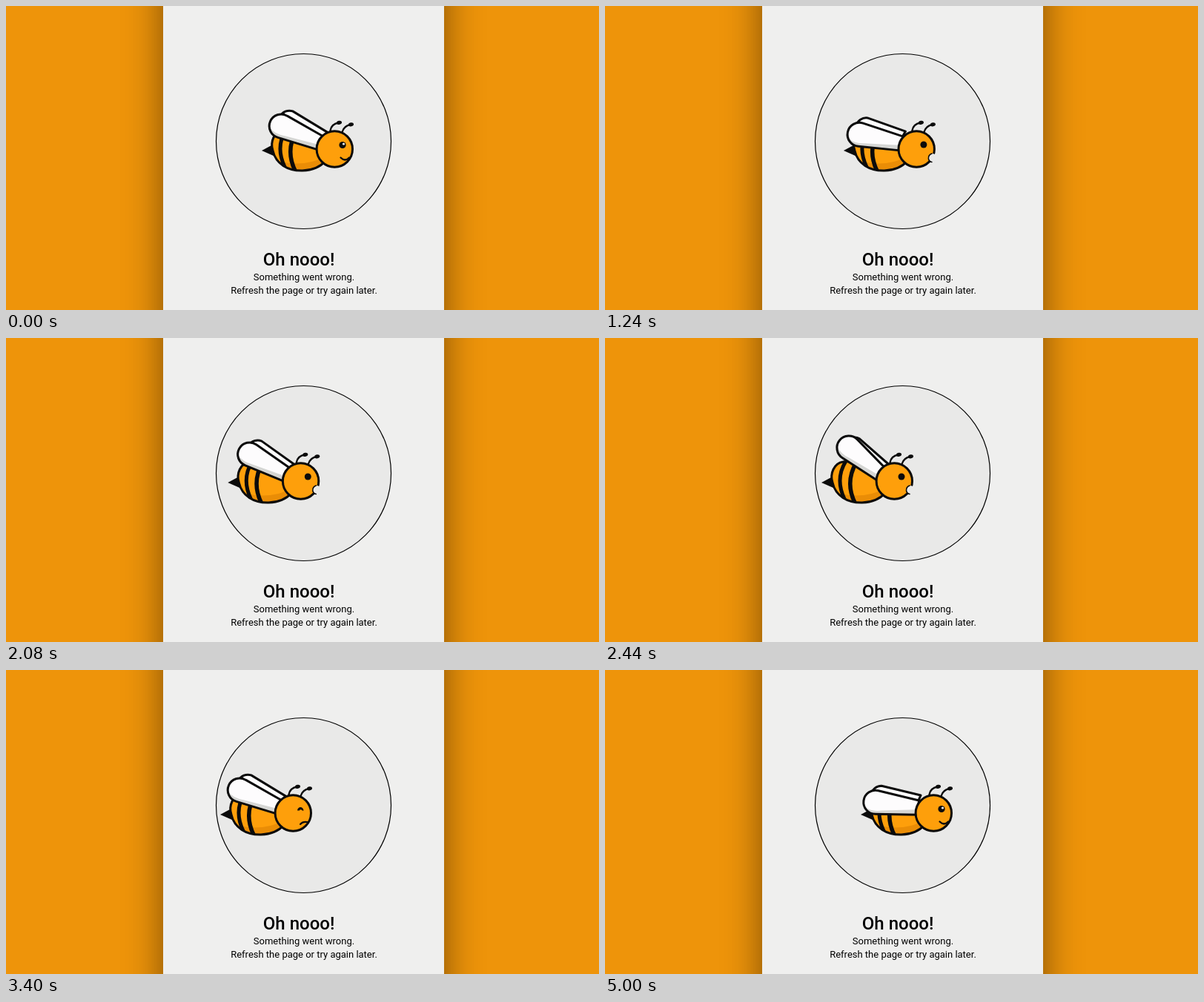
Animation, 800 px wide and 410 px high, one loop 5.04 s. Source, as an HTML page:

```html
<!DOCTYPE html>
<html lang="en">
<head>
<meta charset="utf-8">
<title>Oh nooo!</title>
<style>
  html, body { margin: 0; width: 100%; height: 100%; overflow: hidden; background: #ee940a; }
  .stage { position: relative; width: 800px; height: 410px; overflow: hidden; }
  .panel {
    position: absolute; left: 212px; width: 379px; top: -120px; bottom: -120px;
    background: #efefee; box-shadow: 0 0 48px rgba(0, 0, 0, .48);
  }
  svg { position: absolute; left: 0; top: 0; }
  text { font-family: Roboto, Arial, sans-serif; font-size: 13px; fill: #000; }
  .title { font-size: 24px; font-weight: 500; }
  .line { fill: none; stroke: #0b0b0b; stroke-linecap: round; stroke-linejoin: round; }
  .skin { fill: #fe9f0b; }
  .edge { stroke: #0b0b0b; stroke-width: 3; stroke-linejoin: round; }
  .ink { fill: #0b0b0b; }
</style>
</head>
<body>
<div class="stage">
  <div class="panel"></div>
  <svg width="800" height="410" viewBox="0 0 800 410">
    <defs>
      <clipPath id="port"><circle cx="401.5" cy="182.5" r="117.8"/></clipPath>
      <path id="torso" d="M374 167C362 169 356 183 360 195C364 213 380 222.500 400 222C414 221.500 424 217 431 209L428 184C410 176 386 164 374 167Z"/>
      <clipPath id="inTorso"><use href="#torso"/></clipPath>
    </defs>
    <circle cx="401.5" cy="182.5" r="118" fill="#e9e9e8"/>
    <g clip-path="url(#port)">
      <g id="bee">
        <path class="ink" d="M345 195L359 187.500L362 202.500Z"/>
        <use href="#torso" class="skin"/>
        <g clip-path="url(#inTorso)">
          <path fill="#ea8d06" d="M368 209Q402 219 436 201V228H368Z"/>
          <path class="line" stroke-width="5" d="M378 166Q363 190 376 217"/>
          <path class="line" stroke-width="5.500" d="M392 168Q376 195 391 224"/>
        </g>
        <use href="#torso" class="edge" fill="none"/>

        <path id="backWing" class="edge" fill="#fdfdfd" d="M386 142.500L433 170L420 185L374 167.500A14 14 0 0 1 386 142.500Z"/>
        <g id="frontWing">
          <path fill="#fdfcfd" d="M378.500 149L428 176L421 194L366.500 178.400A16 16 0 1 1 378.500 149Z"/>
          <path fill="#d5d6d4" d="M356 166Q362 174 376 176L422 187L421 194L366.500 178.400Q359 175 356 166Z"/>
          <path class="edge" fill="none" d="M378.500 149L428 176L421 194L366.500 178.400A16 16 0 1 1 378.500 149Z"/>
        </g>

        <g class="line" stroke-width="2.400">
          <path d="M437.500 168Q439 159 449 157.500"/>
          <path d="M453.500 170Q456 161.500 465 160"/>
        </g>
        <ellipse class="ink" cx="449.500" cy="157.300" rx="3.600" ry="2.500" transform="rotate(-12 449.500 157.300)"/>
        <ellipse class="ink" cx="465.500" cy="159.800" rx="3.600" ry="2.500" transform="rotate(-12 465.500 159.800)"/>
        <circle class="skin edge" cx="443.300" cy="193" r="24.200"/>

        <g id="smile">
          <circle class="ink" cx="454" cy="187.500" r="4.600"/>
          <circle cx="455.500" cy="186" r="1.600" fill="#fff"/>
          <path class="line" stroke-width="2.300" d="M451.500 204.500Q457.500 210.500 463 204.500"/>
        </g>
        <g id="gasp">
          <circle class="ink" cx="453" cy="187" r="4.500"/>
          <circle cx="465" cy="204.700" r="5.600" fill="#e9e9e8"/>
          <path class="line" stroke-width="1.600" d="M464 199Q459 201 459.500 206Q460.500 210 464 210.500"/>
        </g>
        <g id="frown">
          <path class="ink" d="M449 189.500C449.500 183.500 457 183.500 457.500 189.500Q455.500 190 454.500 188.500Q452.500 187.500 452 189.500Z"/>
          <path class="line" stroke-width="2.200" d="M453 208Q457 203.500 464 205.500"/>
        </g>
      </g>
    </g>
    <circle cx="401.500" cy="182.500" r="118" fill="none" stroke="#000" stroke-width="1.200"/>
    <text class="title" x="346.800" y="350">Oh nooo!</text>
    <text x="402" y="370" text-anchor="middle">Something went wrong.</text>
    <text x="402" y="388" text-anchor="middle">Refresh the page or try again later.</text>
  </svg>
</div>
<script>
  const LOOP = 5040, STEP = 40;
  const RETURN = 4240, HOME = 5000;

  // [time in ms, horizontal offset]
  const drift = [
    [0, 0], [760, -6.5], [1680, -39], [2280, -49], [2440, -53], [2680, -43],
    [2960, -32], [3320, -51], [3400, -56], [3920, -156], [4080, -195]
  ];
  // [time in ms, wing beats so far]; the wings rest low after the last beat
  const beats = [[0, 0], [760, 1.615], [1680, 3.55], [2440, 5.25], [3400, 7.5], [3940, 8.75]];

  const $ = id => document.getElementById(id);
  const bee = $('bee'), frontWing = $('frontWing'), backWing = $('backWing');
  const faces = ['smile', 'gasp', 'frown'].map($);

  const segment = (keys, t) => {
    let i = 0;
    while (i < keys.length - 2 && t >= keys[i + 1][0]) i++;
    return i;
  };

  const slope = (keys, i) =>
    (keys[i + 1][1] - keys[i][1]) / (keys[i + 1][0] - keys[i][0]);

  // Flat at turning points, mean slope elsewhere.
  function tangent(keys, i) {
    if (i === 0) return 0;
    if (i === keys.length - 1) return slope(keys, i - 1);
    const a = slope(keys, i - 1), b = slope(keys, i);
    return a * b <= 0 ? 0 : (a + b) / 2;
  }

  function smooth(keys, t) {
    const i = segment(keys, t);
    const [t0, a] = keys[i], [t1, b] = keys[i + 1];
    const d = t1 - t0, u = Math.min(1, (t - t0) / d), v = 1 - u;
    return a * v * v * (1 + 2 * u) + b * u * u * (3 - 2 * u)
      + d * u * v * (v * tangent(keys, i) - u * tangent(keys, i + 1));
  }

  function linear(keys, t) {
    const i = segment(keys, t);
    const u = Math.min(1, (t - keys[i][0]) / (keys[i + 1][0] - keys[i][0]));
    return keys[i][1] + u * (keys[i + 1][1] - keys[i][1]);
  }

  function offset(t) {
    if (t < RETURN) return smooth(drift, t);
    const left = Math.max(0, (HOME - t) / (HOME - RETURN));
    return 180 * left ** 2.4;
  }

  const turn = (el, angle) => el.setAttribute('transform', `rotate(${angle} 426 193)`);

  function draw(t) {
    if (t > 2680 && t < 2840) t = 2680;
    bee.setAttribute('transform', `translate(${offset(t)} 0)`);

    const flap = 1 + 16 * Math.sin(2 * Math.PI * linear(beats, t));
    turn(frontWing, flap);
    turn(backWing, flap * (0.9 - 0.015 * flap));

    const mood = t < 1200 || t > 4100 ? 0 : t < 2840 ? 1 : 2;
    faces.forEach((face, i) => { face.style.display = i === mood ? '' : 'none'; });
  }

  const start = performance.now();
  function tick() {
    const t = (performance.now() - start) % LOOP;
    draw(Math.floor(t / STEP) * STEP);
    requestAnimationFrame(tick);
  }
  tick();
</script>
</body>
</html>
```
